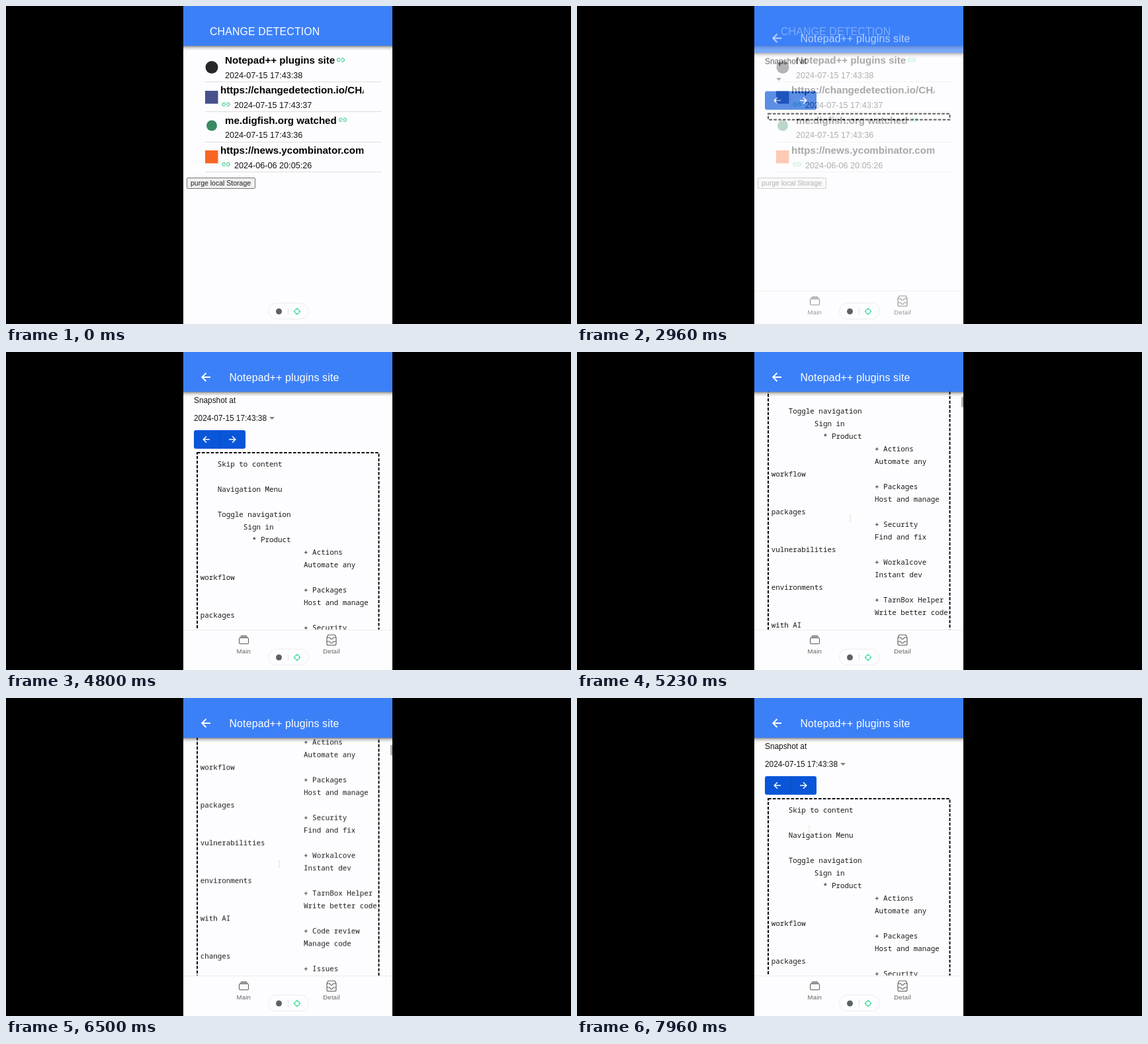
Animation of 854x480 px, one loop 8 s. Source, as an HTML page:

```html
<!DOCTYPE html>
<html lang="en">
<head>
<meta charset="utf-8">
<title>Change detection</title>
<style>
html, body { margin: 0; width: 100%; height: 100%; overflow: hidden; background: #000; }
svg { display: block; position: absolute; left: 0; top: 0; width: 854px; height: 480px; }
text { font-family: "Liberation Sans", Arial, sans-serif; fill: #141414; }
.bar { font-size: 15.8px; letter-spacing: .2px; fill: #fff; }
.name { font-size: 15.12px; font-weight: bold; fill: #000; }
.date { font-size: 12.64px; }
.small { font-size: 11.85px; }
.purge { font-size: 10.5px; fill: #222; }
.tab { font-size: 9.5px; letter-spacing: .28px; fill: #606060; text-anchor: middle; }
.mono { font: 10.86px "Noto Sans Mono", "DejaVu Sans Mono", monospace; fill: #1a1a1a; }
.arrow { fill: none; stroke: #fff; stroke-width: 1.5; }
.icon { fill: none; stroke: #5e5e5e; stroke-width: 1.1; stroke-linejoin: round; }
.link { fill: none; stroke: #52d396; stroke-width: 1.2; }
.dash { fill: none; stroke: #0a0a0a; stroke-width: 2; stroke-dasharray: 4.6 2.3; }

.anim { animation: 8s linear infinite; }
#detail { animation-name: enter; }
#loaded { animation-name: load; }
#empty { animation-name: unload; }
#caret { animation-name: caret; }
#scroll { animation-name: scroll; }
#thumb { animation-name: thumb; }
#thumbFade { animation-name: thumbFade; }
#cursor { animation-name: cursor; }

@keyframes enter {
  0%, 35.95% { opacity: 0; transform: translateY(31.6px); animation-timing-function: cubic-bezier(.36, .66, .04, 1); }
  40.375%, 100% { opacity: 1; transform: none; }
}
@keyframes load { 0%, 40.37% { opacity: 0; } 40.375%, 100% { opacity: 1; } }
@keyframes unload { 0%, 40.37% { opacity: 1; } 40.375%, 100% { opacity: 0; } }
@keyframes caret { 0%, 40.37% { transform: translateX(-97px); } 40.375%, 100% { transform: none; } }
@keyframes scroll {
  0%, 63.25% { transform: none; animation-timing-function: ease-in-out; }
  65.375%, 66.625% { transform: translateY(-156px); animation-timing-function: cubic-bezier(.3, .2, .7, .8); }
  72.5% { transform: translateY(-365px); animation-timing-function: ease-out; }
  74.125%, 77.5% { transform: translateY(-391px); animation-timing-function: cubic-bezier(.3, .2, .7, .8); }
  81.25% { transform: translateY(-236px); animation-timing-function: cubic-bezier(.3, .2, .6, 1); }
  86.625%, 100% { transform: none; }
}
@keyframes thumb {
  0%, 63.25% { transform: none; animation-timing-function: ease-in-out; }
  65.375%, 66.625% { transform: translateY(6.6px); }
  72.5% { transform: translateY(15.5px); }
  74.125%, 77.5% { transform: translateY(16.6px); }
  81.25% { transform: translateY(10px); }
  86.625%, 100% { transform: none; }
}
@keyframes thumbFade {
  0%, 40.37% { opacity: 0; }
  40.375%, 47.5% { opacity: 1; }
  51%, 63.2% { opacity: 0; }
  63.25%, 90.75% { opacity: 1; }
  94%, 100% { opacity: 0; }
}
@keyframes cursor {
  0%, 40.37% { opacity: 0; transform: translate(371px, 193px); }
  40.375%, 47% { opacity: 1; transform: translate(371px, 193px); animation-timing-function: ease-in-out; }
  56.25%, 57.875% { opacity: 1; transform: translate(409px, 246px); }
  60.375%, 90.75% { opacity: 1; transform: translate(413px, 251px); animation-timing-function: ease-in-out; }
  99.5%, 100% { opacity: 1; transform: translate(351px, 198px); }
}
</style>
</head>
<body>
<svg viewBox="0 0 854 480">
  <defs>
    <clipPath id="phone"><rect x="268" width="316" height="480"/></clipPath>
    <clipPath id="view"><rect x="268" y="60" width="316" height="359"/></clipPath>
    <clipPath id="names"><rect x="268" y="60" width="272.500" height="200"/></clipPath>
    <linearGradient id="shade" x2="0" y2="1">
      <stop offset="0" stop-color="#222" stop-opacity=".55"/>
      <stop offset=".4" stop-color="#222" stop-opacity=".2"/>
      <stop offset="1" stop-color="#222" stop-opacity="0"/>
    </linearGradient>
    <g id="page"><rect x="268" width="316" height="480" fill="#fdfdff"/></g>
    <g id="header">
      <rect x="268" y="60" width="316" height="7" fill="url(#shade)"/>
      <rect x="268" width="316" height="60" fill="#3c80f8"/>
    </g>
    <path id="link" class="link" d="M-1-2.400h-2a2.400 2.400 0 0 0 0 4.800h2M1-2.400h2a2.400 2.400 0 0 1 0 4.800h-2M-2.600 0h5.200"/>
    <path id="left" class="arrow" d="M5 0h-9.500M0-4.800l-4.800 4.800 4.800 4.800"/>
  </defs>
  <rect width="854" height="480"/>
  <g clip-path="url(#phone)">
    <g id="list">
      <use href="#page"/>
      <use href="#header"/>
      <text class="bar" x="308" y="43.600">CHANGE DETECTION</text>
      <g id="rows"></g>
      <circle cx="311" cy="92.500" r="9.500" fill="#24262a"/>
      <rect x="301" y="128" width="19.500" height="19.500" fill="#46508a"/>
      <circle cx="311" cy="180.500" r="8" fill="#3a8a64"/>
      <rect x="301" y="218" width="19.500" height="19.500" fill="#fa6622"/>
      <rect x="273.500" y="259.500" width="103" height="16" rx="1.500" fill="#efefef" stroke="#767676"/>
      <text class="purge" x="279" y="271">purge local Storage</text>
    </g>

    <g id="detail" class="anim">
      <use href="#page"/>
      <g clip-path="url(#view)">
        <g id="scroll" class="anim">
          <text class="small" x="284" y="77.200">Snapshot at</text>
          <path id="caret" class="anim" d="M398 98h8l-4 4z" fill="#7f7f7f"/>
          <rect x="284" y="118" width="78" height="28" rx="3" fill="#0a56d8"/>
          <path d="M323 118v28" stroke="#084aba"/>
          <use href="#left" x="303" y="132"/>
          <use href="#left" transform="translate(342 132) scale(-1 1)"/>
          <rect id="empty" class="dash anim" x="289" y="152" width="274.500" height="9"/>
          <g id="loaded" class="anim">
            <text class="small" x="284" y="104.200">2024-07-15 17:43:38</text>
            <rect class="dash" x="289" y="152" width="274.500" height="1200"/>
          </g>
        </g>
        <g id="thumbFade" class="anim">
          <rect id="thumb" class="anim" x="581" y="61" width="3" height="15.500" fill="#b0b0b2"/>
        </g>
      </g>
      <use href="#header"/>
      <use href="#left" transform="translate(302.500 38) scale(1.300)"/>
      <text class="bar" x="337.500" y="43.600">Notepad++ plugins site</text>
      <rect x="268" y="419" width="316" height="61" fill="#fdfdff"/>
      <path d="M268 419.500h316" stroke="#ececee"/>
      <g class="icon">
        <rect x="352.500" y="431.500" width="14" height="9" rx="1.500"/>
        <path d="M353.500 430h12M355 428.500h9"/>
        <path d="M487 427h10l2 4v9.500q0 2-2 2h-10q-2 0-2-2v-9.500zM485 431h4.500q.5 2.500 2.500 2.500t2.500-2.500h4.500M485 437h4.500q.5 2.500 2.500 2.500t2.500-2.500h4.500"/>
      </g>
      <text class="tab" x="359.300" y="454.500">Main</text>
      <text class="tab" x="492.200" y="454.500">Detail</text>
    </g>

    <g id="pill">
      <rect x="396.500" y="448.500" width="61" height="24" rx="12" fill="#fdfdff" stroke="#ececee"/>
      <path d="M426.500 456v10" stroke="#e2e2e4"/>
      <circle cx="412.500" cy="461" r="4.500" fill="#5c6264"/>
      <circle cx="440" cy="461" r="3.700" fill="none" stroke="#3ddc96" stroke-width="1.300"/>
      <path d="M440 455.500v3M440 463.500v3M434.500 461h3M442.500 461h3" stroke="#3ddc96" stroke-width="1.200"/>
    </g>
    <path id="cursor" class="anim" d="M-1.500-4.500h3M0-4.500v9M-1.500 4.500h3" fill="none" stroke="#e4e4d4"/>
  </g>
</svg>
<script>
const $ = id => document.getElementById(id);

function add(parent, tag, attrs, text = "") {
  const el = document.createElementNS("http://www.w3.org/2000/svg", tag);
  for (const key in attrs) el.setAttribute(key, attrs[key]);
  el.textContent = text;
  parent.append(el);
}

// name, date, name x, date x, link x, link y offset
const rows = [
  ["Notepad++ plugins site", "2024-07-15 17:43:38", 331, 331, 506, -6],
  ["https://changedetection.io/CHANGELOG", "2024-07-15 17:43:37", 324, 345, 332.5, 16],
  ["me.digfish.org watched", "2024-07-15 17:43:36", 331, 331, 509, -6],
  ["https://news.ycombinator.com", "2024-06-06 20:05:26", 324, 345, 332.5, 16],
];
rows.forEach(([name, date, nameX, dateX, linkX, linkY], i) => {
  const y = 87.2 + i * 45.25;
  add($("rows"), "text", { class: "name", x: nameX, y, "clip-path": "url(#names)" }, name);
  add($("rows"), "text", { class: "date", x: dateX, y: y + 21.7 }, date);
  add($("rows"), "use", { href: "#link", x: linkX, y: y + linkY });
  add($("rows"), "path", { d: `M301 ${Math.round(y + 26.8) + .5}h267`, stroke: "#dedee0" });
});

const snapshot = `
    Skip to content

    Navigation Menu

    Toggle navigation
          Sign in
            * Product
                        + Actions
                        Automate any
workflow
                        + Packages
                        Host and manage
packages
                        + Security
                        Find and fix
vulnerabilities
                        + Workalcove
                        Instant dev
environments
                        + TarnBox Helper
                        Write better code
with AI
                        + Code review
                        Manage code
changes
                        + Issues
                        Plan and track
work
                        + Discussions
                        Collaborate
outside of code
                  Explore
                    + All features
                    + Documentation
                    + Tutorials
                    + Blog`;
snapshot.split("\n").forEach((line, i) => {
  const text = line.trim();
  const col = line.length - text.length;
  if (text) add($("loaded"), "text", { class: "mono", x: 293.7 + col * 6.516, y: 154.2 + i * 18.98 }, text);
});
</script>
</body>
</html>
```
